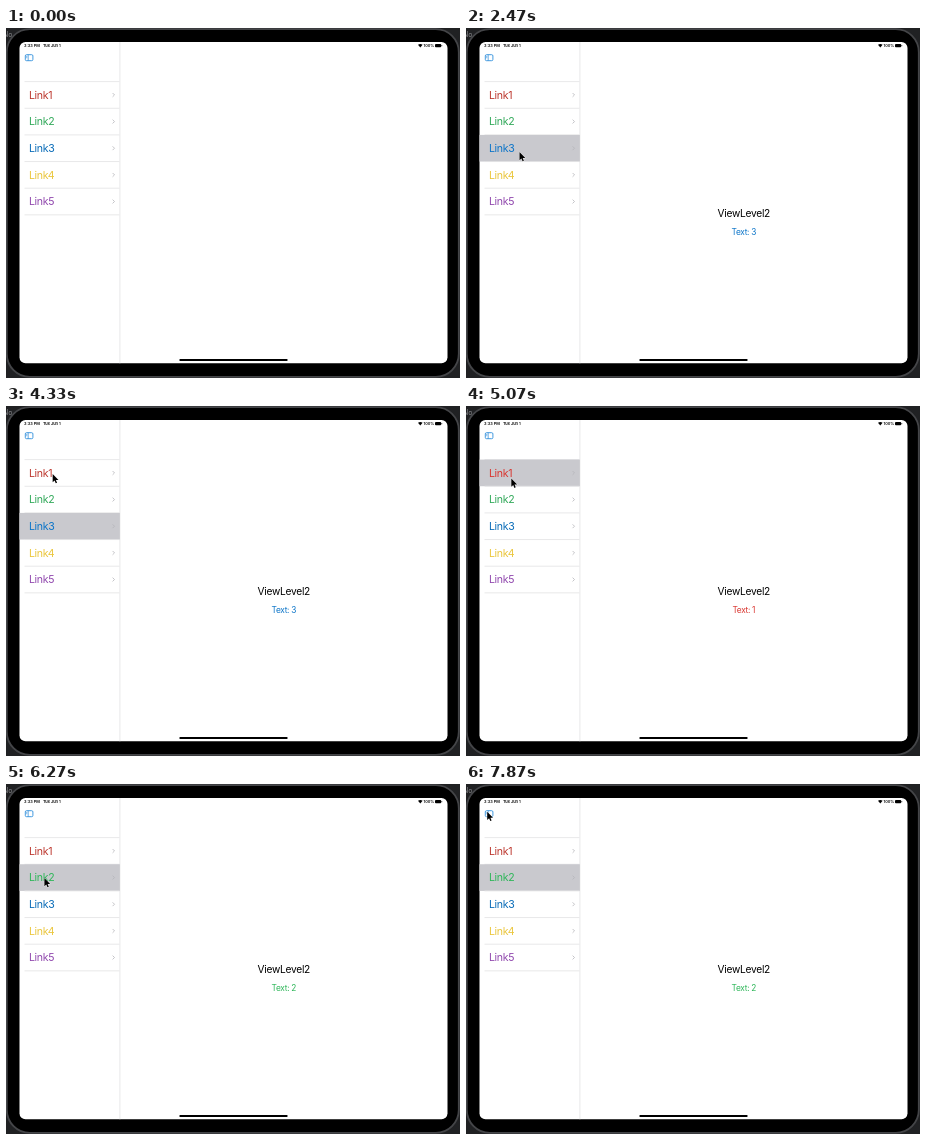
Animation, 454 px wide and 350 px high, one loop 8000 ms. Source, as an HTML page:

```html
<!DOCTYPE html>
<html lang="en">
<head>
<meta charset="utf-8">
<title>Split view navigation</title>
<style>
  html, body { margin: 0; width: 100%; height: 100%; overflow: hidden; background: #202123; }
  svg { display: block; width: 454px; height: 350px; font-family: Inter, Roboto, sans-serif; }
  .link { font-size: 10.6px; letter-spacing: -.3px; }
  .title { font-size: 10.2px; letter-spacing: -.28px; text-anchor: middle; }
  .detail { font-size: 8.3px; letter-spacing: -.3px; text-anchor: middle; }
  .status { font-size: 3.9px; font-weight: 600; }
  .line { stroke: #e2e2e4; stroke-width: .8; }
</style>
</head>
<body>
<svg viewBox="0 0 454 350">
  <rect width="454" height="350" fill="#202123"/>
  <text x="-3" y="8.5" font-size="7" fill="#85868a">No</text>
  <rect x=".8" y="1.2" width="452" height="347.6" rx="23" fill="#000" stroke="#444548" stroke-width="1.8"/>
  <rect x="13.5" y="14" width="428" height="321.3" rx="6" fill="#fff"/>

  <g class="status">
    <text x="18" y="19">3:33 PM</text>
    <text x="37" y="19">Tue Jun 1</text>
    <text x="417.6" y="19">100%</text>
  </g>
  <path d="M412 16.8q2.3-1.7 4.6 0L414.3 19.4z"/>
  <rect x="429" y="16" width="6.2" height="3.2" rx=".9"/>
  <rect x="435.5" y="17" width=".7" height="1.2" rx=".3"/>

  <g fill="none" stroke="#2f8fdc" stroke-width=".9">
    <rect x="19.3" y="26.7" width="7.6" height="6" rx="1.2"/>
    <path d="M22.2 26.7v6M20.2 28.4h1.1M20.2 29.7h1.1" stroke-width=".7"/>
  </g>

  <path class="line" d="M113.9 14V335.3"/>
  <g id="list"></g>

  <g id="pane" visibility="hidden">
    <text class="title" x="277.8" y="188.6">ViewLevel2</text>
    <text class="detail" x="277.8" y="207.3" id="detail"></text>
  </g>

  <rect x="173.3" y="331.1" width="108.4" height="1.9" rx=".95"/>
  <path id="cursor" d="M0 0V8.2L1.9 6.5 3.1 9.3 4.4 8.7 3.2 6H5.8Z"
        fill="#000" stroke="#fff" stroke-width=".7" stroke-linejoin="round" paint-order="stroke"/>
</svg>
<script>
const LOOP = 8000, TICK = 1000 / 15;
const ROW_TOP = 53.6, ROW_H = 26.65;
const $ = id => document.getElementById(id);

// normal colour, selected colour
const links = [
  ['#bd382f', '#d9352f'],
  ['#32a95a', '#2eb659'],
  ['#0a6cb8', '#0b74c8'],
  ['#eac63c', '#eac63c'],
  ['#9149ae', '#9149ae']
];

// time, selected row
const picks = [[0, 0], [1933, 3], [4533, 1], [6200, 2]];

const out = p => u => 1 - (1 - u) ** p;
const smooth = u => u * u * (3 - 2 * u);

// start, end, target x, target y, easing
const enter = { time: 466, x: 106, y: 333 };
const moves = [
  [466, 1333, 59.3, 134, out(1.6)],
  [1333, 1933, 54, 124.5, out(2)],
  [2200, 2467, 53.5, 124, smooth],
  [2667, 3067, 50.5, 127, smooth],
  [3267, 4133, 46.3, 69.5, smooth],
  [4133, 4333, 46.8, 67.5, smooth],
  [4467, 4733, 46.5, 69, smooth],
  [5000, 5800, 38.4, 94, out(1.8)],
  [6467, 6533, 37.6, 94.3, smooth],
  [6667, 7533, 19.2, 28, smooth],
  [7533, 7733, 19.8, 27.3, smooth],
  [7800, 7867, 21.2, 27.7, smooth]
];

const line = y => `<path class="line" d="M18.5 ${y}H113.5"/>`;
$('list').innerHTML = links.map(([color], i) => {
  const top = ROW_TOP + i * ROW_H, mid = top + ROW_H / 2;
  return `${line(top)}
    <rect class="fill" x="13.5" y="${top}" width="100.4" height="${ROW_H}" fill="#c9c9ce" visibility="hidden"/>
    <text class="link" x="22.9" y="${mid + 3.9}" fill="${color}">Link${i + 1}</text>
    <path d="M106.6 ${mid - 1.9}l1.9 1.9-1.9 1.9" fill="none" stroke="#b5b5ba" stroke-width=".8"/>`;
}).join('') + line(ROW_TOP + links.length * ROW_H);

const fills = document.querySelectorAll('.fill');
const labels = document.querySelectorAll('.link');

function select(n) {
  links.forEach((colors, i) => {
    const on = i + 1 === n;
    fills[i].setAttribute('visibility', on ? 'visible' : 'hidden');
    labels[i].setAttribute('fill', colors[+on]);
  });
  $('pane').setAttribute('visibility', n ? 'visible' : 'hidden');
  if (n) {
    $('detail').textContent = `Text: ${n}`;
    $('detail').setAttribute('fill', links[n - 1][1]);
  }
}

function pointerAt(t) {
  let { x, y } = enter;
  for (const [start, end, tx, ty, ease] of moves) {
    if (t < start) break;
    const k = ease(Math.min(1, (t - start) / (end - start)));
    x += (tx - x) * k;
    y += (ty - y) * k;
  }
  return [x, y];
}

let shown = -1;
function draw(now) {
  const t = Math.floor((now % LOOP) / TICK + .01) * TICK;
  const row = picks.filter(([time]) => time <= t + 1).pop()[1];
  if (row !== shown) select(shown = row);
  const [x, y] = pointerAt(t);
  $('cursor').setAttribute('transform', `translate(${x} ${y})`);
  $('cursor').setAttribute('visibility', t < enter.time ? 'hidden' : 'visible');
}

const begin = performance.now();
function loop() {
  draw(performance.now() - begin);
  requestAnimationFrame(loop);
}
loop();
</script>
</body>
</html>
```
